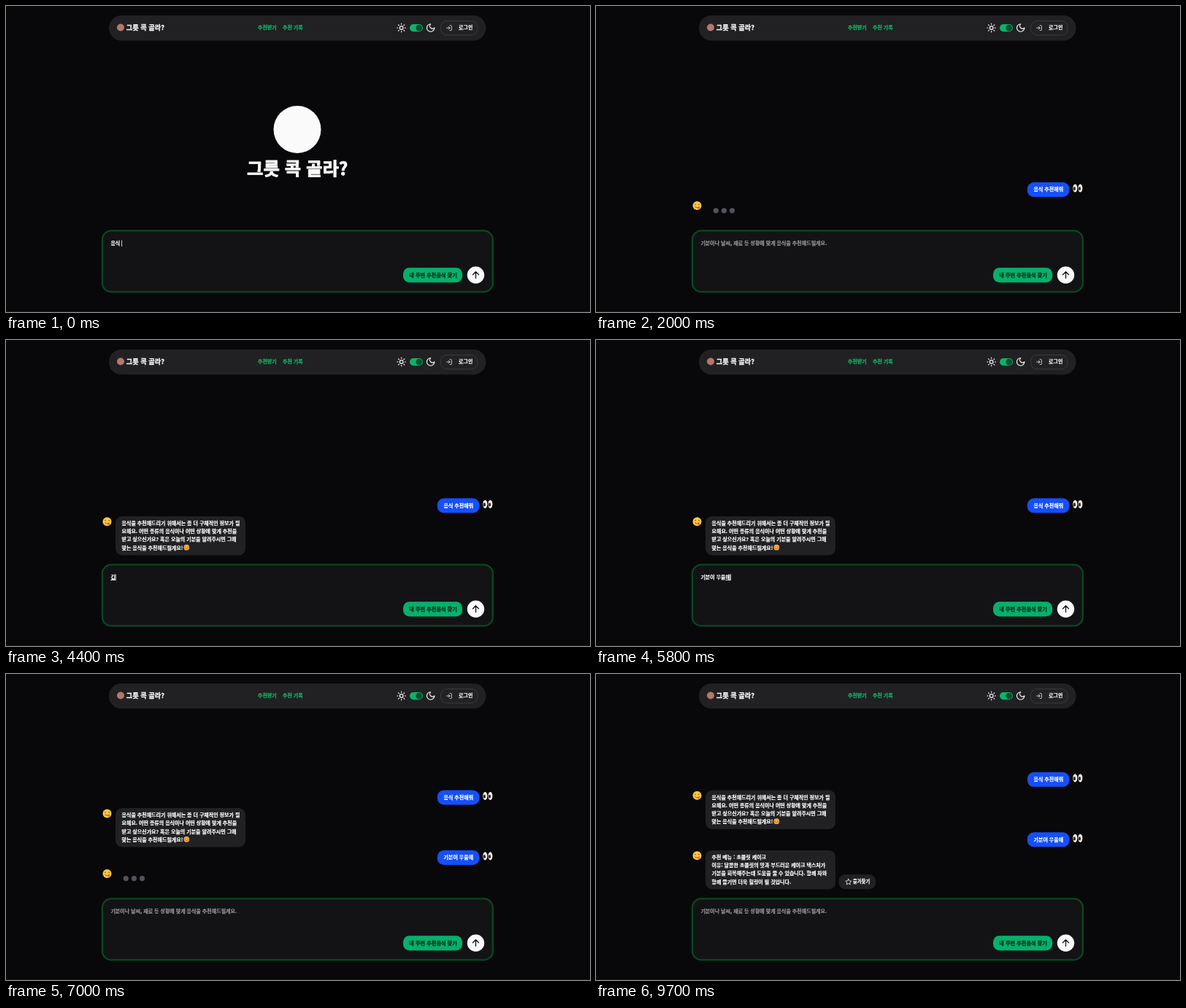
An HTML page that plays this animation: 800 px wide and 420 px high, repeating every 9900 ms.

```html
<!DOCTYPE html>
<html lang="ko">
<head>
<meta charset="utf-8">
<title>그릇 콕 골라?</title>
<style>
html, body { margin: 0; width: 100%; height: 100%; overflow: hidden; background: #08080a; }
svg { display: block; width: 800px; height: 420px; }
text { font: 700 7px "Noto Sans CJK KR", "Noto Sans CJK", "Noto Sans CJK JP", sans-serif; color: #fafafa; fill: currentColor; stroke: currentColor; stroke-width: .035em; stroke-linejoin: round; white-space: pre; }
.line { fill: none; stroke: #fafafa; stroke-linecap: round; stroke-linejoin: round; }
</style>
</head>
<body>
<svg id="stage" viewBox="0 0 800 420"></svg>
<script>
const LOOP = 9900, SEND1 = 1000, REPLY1 = 2400, SEND2 = 6000, REPLY2 = 7200, SCROLL = 500;

// Time, text so far; the last letter is still being composed.
const TYPED = [
  [0, '음식 '], [100, '음식 ㅊ'], [200, '음식 추'], [300, '음식 춫'], [400, '음식 추천'],
  [500, '음식 추천해'], [600, '음식 추천해주'], [700, '음식 추천해줘'], [SEND1, ''],
  [4200, 'ㄱ'], [4300, '기'], [4400, '깁'], [4500, '기부'], [4700, '기분'],
  [4800, '기분ㅇ'], [4900, '기분이'], [5000, '기분이 '], [5200, '기분이 ㅇ'],
  [5300, '기분이 우'], [5500, '기분이 우우'], [5600, '기분이 우울'],
  [5800, '기분이 우울해'], [SEND2, '']
];
// Time, resting height of the first message.
const SCROLLS = [[SEND1, 242], [REPLY1, 217.3], [SEND2, 159.4], [REPLY2, 134.8]];

const rect = (x, y, w, h, r, fill, more = '') =>
  `<rect x="${x}" y="${y}" width="${w}" height="${h}" rx="${r}" fill="${fill}" ${more}/>`;
const dot = (x, y, r, fill) => `<circle cx="${x}" cy="${y}" r="${r}" fill="${fill}"/>`;
const label = (x, mid, str, size = 7, color = '#fafafa') =>
  `<text x="${x}" y="${mid + size * .37}" style="font-size:${size}px;color:${color}">${str}</text>`;
const icon = (x, y, scale, d, width = 2) =>
  `<path class="line" transform="translate(${x} ${y}) scale(${scale}) translate(-12 -12)" stroke-width="${width}" d="${d}"/>`;

const face = (x, y, r, tongue) => `<g transform="translate(${x} ${y}) scale(${r / 6})">
  ${dot(0, 0, 6, tongue ? '#ffc645' : '#f5ae3f')}
  <path d="M-3.5-1.2q1-1.5 2 0M1.5-1.2q1-1.5 2 0M-3.2 1.5Q0 4.4 3.2 1.5" fill="none" stroke="#7a4a16" stroke-width=".9"/>
  ${tongue ? '<ellipse cx="2.3" cy="3.2" rx="1.5" ry="1.3" fill="#ee5a55"/>'
           : dot(-4, 1, 1.2, '#ee6a4a') + dot(4, 1, 1.2, '#ee6a4a')}</g>`;

const eyes = y => [656.3, 663.4].map(x =>
  `<ellipse cx="${x}" cy="${y}" rx="3" ry="5.6" fill="#f4f1ee"/>
   <ellipse cx="${x - .9}" cy="${y + .6}" rx="1.6" ry="2.6" fill="#352721"/>`).join('');

const userMsg = (y, str) =>
  rect(590.8, y, 57.8, 20, 9, '#1450fa') + label(599.5, y + 9.8, str) + eyes(y + 8);

const reply = (y, lines) => rect(150, y, 178, 53.5, 9, '#212123') +
  lines.map((s, i) => label(158.5, y + 9.8 + i * 11.1, s)).join('');

const waiting = y => [164.3, 175.4, 186.5].map(x => dot(x, y, 3.6, '#52525b')).join('');

const rays = [...Array(8)].map((_, i) => {
  const a = i * Math.PI / 4, c = Math.cos(a), s = Math.sin(a);
  return `M${12 + 8 * c} ${12 + 8 * s}L${12 + 10 * c} ${12 + 10 * s}`;
}).join('');

const header = rect(141, 13, 516.5, 34.5, 17.2, '#212123') +
  dot(157, 29.5, 5, '#b5786a') + label(164.8, 29.7, '그릇 콕 골라?', 9.2) +
  label(345, 29.6, '추천받기', 7, '#12b76a') + label(379, 29.6, '추천 기록', 7, '#12b76a') +
  icon(541.7, 30, .58, 'M16 12a4 4 0 1 1-8 0a4 4 0 0 1 8 0' + rays) +
  rect(553, 25, 18, 10.2, 5.1, '#0cb26b') + dot(565.8, 30.1, 4.3, '#07502c') +
  icon(581.7, 30, .58, 'M12 3a6 6 0 0 0 9 9 9 9 0 1 1-9-9Z') +
  rect(595.5, 20.5, 50.5, 19.5, 8.5, '#222225', 'stroke="#3a3a3e"') +
  icon(607, 30.1, .38, 'M15 3h4a2 2 0 0 1 2 2v14a2 2 0 0 1-2 2h-4M10 17l5-5-5-5M15 12H3') +
  label(620, 29.7, '로그인', 7);

const inputBox = rect(131.9, 308.4, 535, 84, 12.5, '#131315', 'stroke="#064a20" stroke-width="2.2"') +
  `<g id="hint">${label(143.4, 325.3, '기분이나 날씨, 재료 등 상황에 맞게 음식을 추천해드릴게요.', 7, '#929297')}</g>
  <text id="typed" x="143.4" y="328"><tspan></tspan><tspan text-decoration="underline"></tspan></text>` +
  rect(143.4, 321.6, .8, 8.4, 0, '#fafafa', 'id="caret"') +
  rect(544, 359.2, 81.2, 20.3, 8.5, '#06b06c') +
  label(552.3, 369, '내 주변 추천음식 찾기', 7.2, '#06351f') +
  dot(643.5, 369.3, 11.7, '#fafafa') +
  `<path class="line" style="stroke:#111" stroke-width="1.3" d="M643.5 373.6v-8.8m-4 4l4-4l4 4"/>`;

const star = 'M12 2l3.1 6.3 6.9 1-5 4.9 1.2 6.8L12 17.8 5.8 21 7 14.2 2 9.3l6.9-1z';

document.getElementById('stage').innerHTML = `
  <defs><clipPath id="list"><rect y="50" width="800" height="250"/></clipPath></defs>
  ${rect(0, 0, 800, 420, 0, '#08080a')}${rect(0, 419, 800, 1, 0, '#18181a')}
  ${header}
  <g id="intro">${dot(399, 169.5, 32.5, '#fafafa')}${label(330, 223, '그릇 콕 골라?', 24.4)}</g>
  <g clip-path="url(#list)"><g id="chat">
    <g id="ask1">${userMsg(0, '음식 추천해줘')}${face(138.5, 32, 6, true)}</g>
    <g id="wait1">${waiting(38.8)}</g>
    <g id="reply1">${reply(24.6, ['음식을 추천해드리기 위해서는 좀 더 구체적인 정보가 필',
      '요해요. 어떤 종류의 음식이나 어떤 상황에 맞게 추천을',
      '받고 싶으신가요? 혹은 오늘의 기분을 알려주시면 그에',
      '맞는 음식을 추천해드릴게요!'])}${face(247.3, 67.4, 3.9, false)}</g>
    <g id="ask2">${userMsg(82.5, '기분이 우울해')}${face(138.5, 114.5, 6, true)}</g>
    <g id="wait2">${waiting(121.3)}</g>
    <g id="reply2">${reply(107.1, ['추천 메뉴 : 초콜릿 케이크',
      '이유: 달콤한 초콜릿의 맛과 부드러운 케이크 텍스처가',
      '기분을 회복해주는데 도움을 줄 수 있습니다. 함께 차와',
      '함께 즐기면 더욱 힐링이 될 것입니다.'])}
      ${rect(332.5, 140.5, 50.7, 20, 8.5, '#212123')}${icon(345.8, 150.5, .4, star)}
      ${label(352, 150.2, '즐겨찾기', 6.3)}</g>
  </g></g>
  ${inputBox}`;

const el = id => document.getElementById(id);
const show = (id, on) => el(id).setAttribute('display', on ? 'inline' : 'none');
const ease = p => p * p * (3 - 2 * p);

function scrollTop(t) {
  let y = 300;
  for (const [start, to] of SCROLLS)
    if (t >= start) y += (to - y) * ease(Math.min(1, (t - start) / SCROLL));
  return y;
}

function draw(t) {
  show('intro', t < SEND1);
  show('ask1', t >= SEND1);
  show('wait1', t >= SEND1 && t < REPLY1);
  show('reply1', t >= REPLY1);
  show('ask2', t >= SEND2);
  show('wait2', t >= SEND2 && t < REPLY2);
  show('reply2', t >= REPLY2);
  el('chat').setAttribute('transform', `translate(0 ${scrollTop(t)})`);
  const pulse = .75 + .25 * Math.cos(t * Math.PI / 500);
  for (const id of ['wait1', 'wait2']) el(id).setAttribute('opacity', pulse);

  const str = TYPED.findLast(([at]) => t >= at)[1];
  const cut = str.endsWith(' ') ? str.length : Math.max(0, str.length - 1);
  const typed = el('typed');
  typed.children[0].textContent = str.slice(0, cut);
  typed.children[1].textContent = str.slice(cut);
  show('hint', !str);
  const beat = Math.floor((t + (t < SEND2 ? 70 : 40)) * 3 / 1000) % 2;
  show('caret', str || beat === (t < SEND2 ? 1 : 0));
  el('caret').setAttribute('x', 143.4 + (str ? typed.getComputedTextLength() : 0));
}

const began = performance.now();
function tick() {
  draw((performance.now() - began) % LOOP);
  requestAnimationFrame(tick);
}
tick();
</script>
</body>
</html>
```
